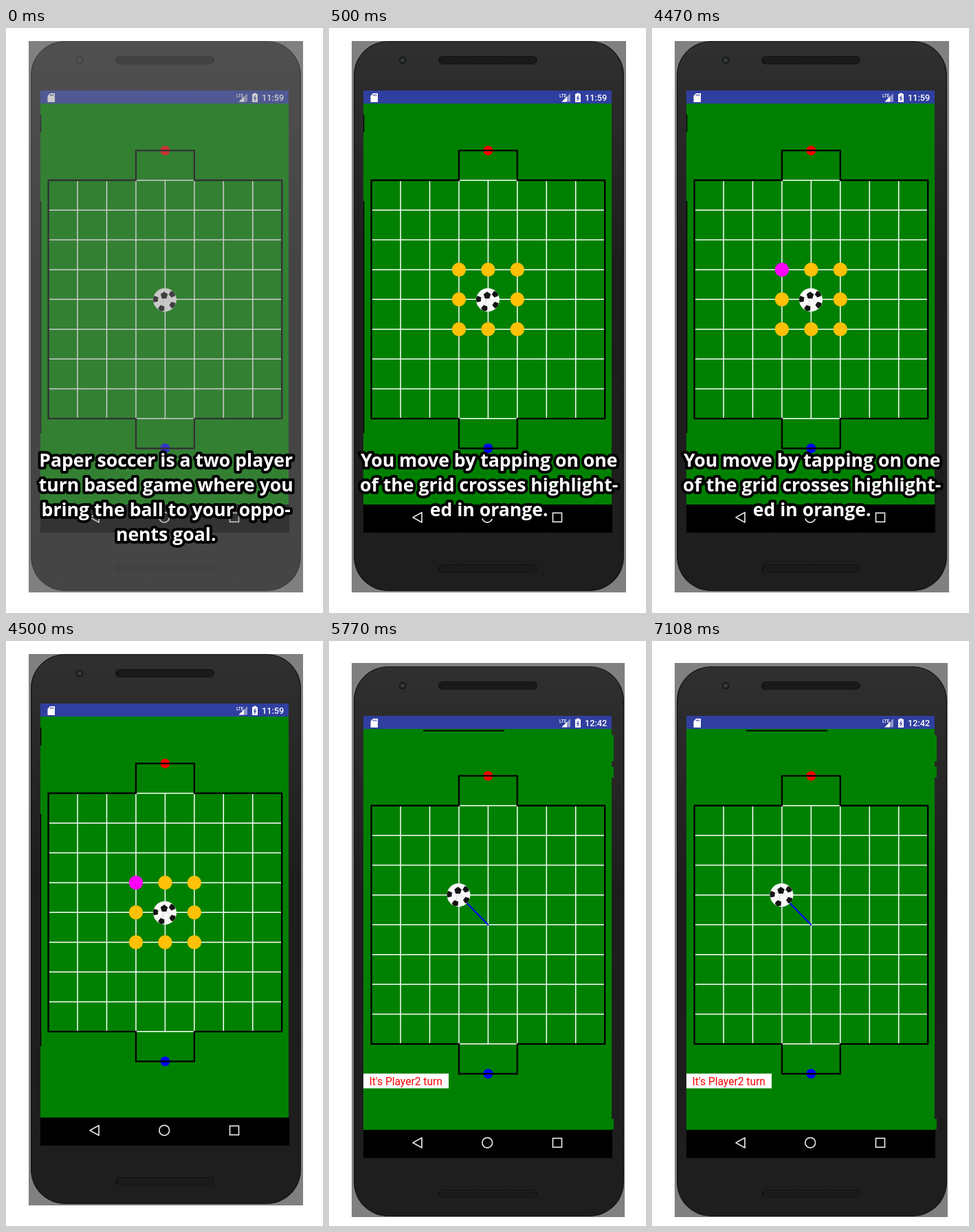
An HTML page with a canvas that plays this animation: 461 px wide and 852 px high, repeating every 8000 ms.

```html
<!DOCTYPE html>
<html lang="en">
<head>
<meta charset="utf-8">
<title>Paper soccer tutorial</title>
<style>
html, body { margin: 0; width: 100%; height: 100%; overflow: hidden; background: #fff; }
canvas { display: block; }
</style>
</head>
<body>
<canvas id="stage" width="461" height="852"></canvas>
<script>
const ctx = document.getElementById('stage').getContext('2d');
const LOOP = 8000;
const TIMES = { hint: 500, tap: 4470, hintEnd: 4500, moved: 5770 };
const TAU = Math.PI * 2;
const GREEN = '#008000';
const BLUE = '#303f9f';
const GREY = '#808080';
const CELLS = 8;
const INTRO = ['Paper soccer is a two player', 'turn based game where you',
               'bring the ball to your oppo-', 'nents goal.'];
const MOVE_HINT = ['You move by tapping on one', 'of the grid crosses highlight-',
                   'ed in orange.'];

const gridX = col => 61.6 + col * 42.45;
const gridY = row => 221.8 + row * 43.38;

function rect(x, y, w, h, color) {
  ctx.fillStyle = color;
  ctx.fillRect(x, y, w, h);
}

function disc(x, y, r, color) {
  ctx.fillStyle = color;
  ctx.beginPath();
  ctx.arc(x, y, r, 0, TAU);
  ctx.fill();
}

function roundRect(x, y, w, h, r, fill) {
  ctx.beginPath();
  ctx.roundRect(x, y, w, h, r);
  ctx.fillStyle = fill;
  ctx.fill();
}

function polygon(points, color) {
  ctx.beginPath();
  points.forEach(([x, y]) => ctx.lineTo(x, y));
  ctx.fillStyle = color;
  ctx.fill();
}

function polyline(points, color, width) {
  ctx.beginPath();
  points.forEach(([x, y]) => ctx.lineTo(x, y));
  ctx.strokeStyle = color;
  ctx.lineWidth = width;
  ctx.lineJoin = ctx.lineCap = 'round';
  ctx.stroke();
}

function text(str, x, y, font, color) {
  ctx.font = font;
  ctx.textAlign = 'left';
  ctx.fillStyle = color;
  ctx.fillText(str, x, y);
}

function speaker(y) {
  roundRect(159, y, 144, 12, 6, '#141414');
  for (let row = 0; row < 4; row++) {
    for (let x = 163 + row % 2 * 1.5; x < 300; x += 3) {
      rect(x, y + 2 + row * 2.4, 1.2, 1.2, '#343434');
    }
  }
}

function phoneBody() {
  const shade = ctx.createLinearGradient(0, 19, 0, 820);
  shade.addColorStop(0, '#303030');
  shade.addColorStop(0.4, '#1d1d1d');
  shade.addColorStop(1, '#1e1e1e');
  roundRect(36, 19, 393, 801, 50, '#161616');
  roundRect(37.5, 20, 390, 798.5, 49, shade);
  disc(107, 47, 5.5, '#1b1b1b');
  disc(107, 47, 3, '#343c40');
  speaker(41);
  speaker(781);
}

function statusBar(clock) {
  rect(50, 91, 361, 19, BLUE);
  polygon([[64, 95], [71, 95], [71, 108], [60.5, 108], [60.5, 99]], '#fff');
  for (let x = 64; x < 70; x += 2) rect(x, 96.5, 1, 2.5, BLUE);
  text('LTE', 335, 101, '500 6.5px Roboto, sans-serif', '#fff');
  polygon([[351, 95], [351, 107.5], [338.5, 107.5]], '#8f97cb');
  polygon([[346, 100], [346, 107.5], [338.5, 107.5]], '#fff');
  rect(358, 96, 8, 12, '#fff');
  rect(360, 94.8, 4, 2, '#fff');
  polyline([[362.6, 99], [360.6, 102.2], [363.4, 102.2], [361.4, 105.5]], BLUE, 1.2);
  text(clock, 372, 106, '500 12.7px Roboto, sans-serif', '#fff');
}

function navBar() {
  rect(50, 694, 362, 41, '#000');
  polyline([[135, 705.5], [122, 712.7], [135, 720], [135, 705.5]], '#e4e4e4', 1.7);
  ctx.beginPath();
  ctx.arc(230.2, 712.7, 7.4, 0, TAU);
  ctx.stroke();
  ctx.lineJoin = 'miter';
  ctx.strokeRect(325.5, 706.3, 13, 13);
}

// Half of the border, from one side line round the goal to the other.
function pitchEnd(goalRow, row) {
  const middle = CELLS / 2;
  disc(gridX(middle), gridY(goalRow), 7, row ? '#00f' : '#f00');
  polyline([[gridX(3), gridY(row)], [gridX(5), gridY(row)]], '#fff', 1.5);
  polyline([[0, middle], [0, row], [3, row], [3, goalRow], [5, goalRow],
            [5, row], [CELLS, row], [CELLS, middle]]
    .map(([c, r]) => [gridX(c), gridY(r)]), '#000', 2.4);
}

function pitch() {
  for (let i = 1; i < CELLS; i++) {
    polyline([[gridX(i), gridY(0)], [gridX(i), gridY(CELLS)]], '#fff', 1.5);
    polyline([[gridX(0), gridY(i)], [gridX(CELLS), gridY(i)]], '#fff', 1.5);
  }
  pitchEnd(-1, 0);
  pitchEnd(CELLS + 1, CELLS);
}

function pentagon(x, y, r, turn) {
  const corners = Array.from({ length: 5 }, (_, i) => {
    const a = turn + i * TAU / 5;
    return [x + r * Math.cos(a), y + r * Math.sin(a)];
  });
  polygon(corners, '#141414');
}

function ball(x, y) {
  ctx.save();
  ctx.translate(x, y);
  disc(0, 0, 17, '#f8f8f8');
  ctx.clip();
  for (let i = 0; i < 4; i++) {
    const angle = (i * 75 - 40) * TAU / 360;
    const [px, py] = [14 * Math.cos(angle), 13 * Math.sin(angle)];
    polyline([[-1, -6], [px, py]], '#d4d4d4', 0.8);
    pentagon(px, py, 5, angle);
  }
  pentagon(-1, -6.5, 5.5, -TAU / 4);
  ctx.restore();
}

function targets(tapped) {
  for (let row = 3; row <= 5; row++) {
    for (let col = 3; col <= 5; col++) {
      const first = row === 3 && col === 3;
      if (row === 4 && col === 4) continue;
      disc(gridX(col), gridY(row), 10.2, first && tapped ? '#f0f' : '#ffc107');
    }
  }
}

function caption(lines) {
  ctx.font = '700 26.6px "Open Sans", "Noto Sans", sans-serif';
  ctx.textAlign = 'center';
  ctx.lineJoin = 'round';
  ctx.lineWidth = 8;
  ctx.strokeStyle = '#000';
  ctx.fillStyle = '#fff';
  for (const paint of ['strokeText', 'fillText']) {
    lines.forEach((line, i) => ctx[paint](line, 232.7, 638.5 + i * 36));
  }
}

function phone(clock) {
  phoneBody();
  rect(50, 110, 361, 584, GREEN);
  statusBar(clock);
  navBar();
  pitch();
}

function choosing(t) {
  rect(33, 19, 399, 803, GREY);
  phone('11:59');
  rect(50, 126, 1.3, 26, '#000');
  rect(50, 252, 1.3, 338, '#000');
  if (t >= TIMES.hint) targets(t >= TIMES.tap);
  ball(231, 396);
  if (t < TIMES.hint) {
    rect(33, 19, 399, 803, 'rgba(128, 128, 128, 0.4)');
    caption(INTRO);
  } else if (t < TIMES.hintEnd) {
    caption(MOVE_HINT);
  }
}

function moved() {
  rect(33, 32, 397, 807, GREY);
  ctx.save();
  ctx.beginPath();
  ctx.rect(33, 32, 397, 807);
  ctx.clip();
  ctx.translate(0, 18);
  phone('12:42');
  polyline([[gridX(4), gridY(4)], [gridX(3), gridY(3)]], '#00f', 2);
  ball(188.5, 352);
  ctx.restore();
  rect(411, 137, 3, 38, GREEN);
  rect(411, 183, 3, 16, GREEN);
  rect(411, 696, 3, 15, GREEN);
  rect(137, 129.5, 118, 2, '#000');
  rect(50, 630, 124, 21.5, '#fff');
  text("It's Player2 turn", 58.5, 647, '15.6px Roboto, sans-serif', '#f00');
}

function draw() {
  const t = performance.now() % LOOP;
  rect(0, 0, 461, 852, '#fff');
  if (t < TIMES.moved) choosing(t);
  else moved();
  requestAnimationFrame(draw);
}
draw();
</script>
</body>
</html>
```
